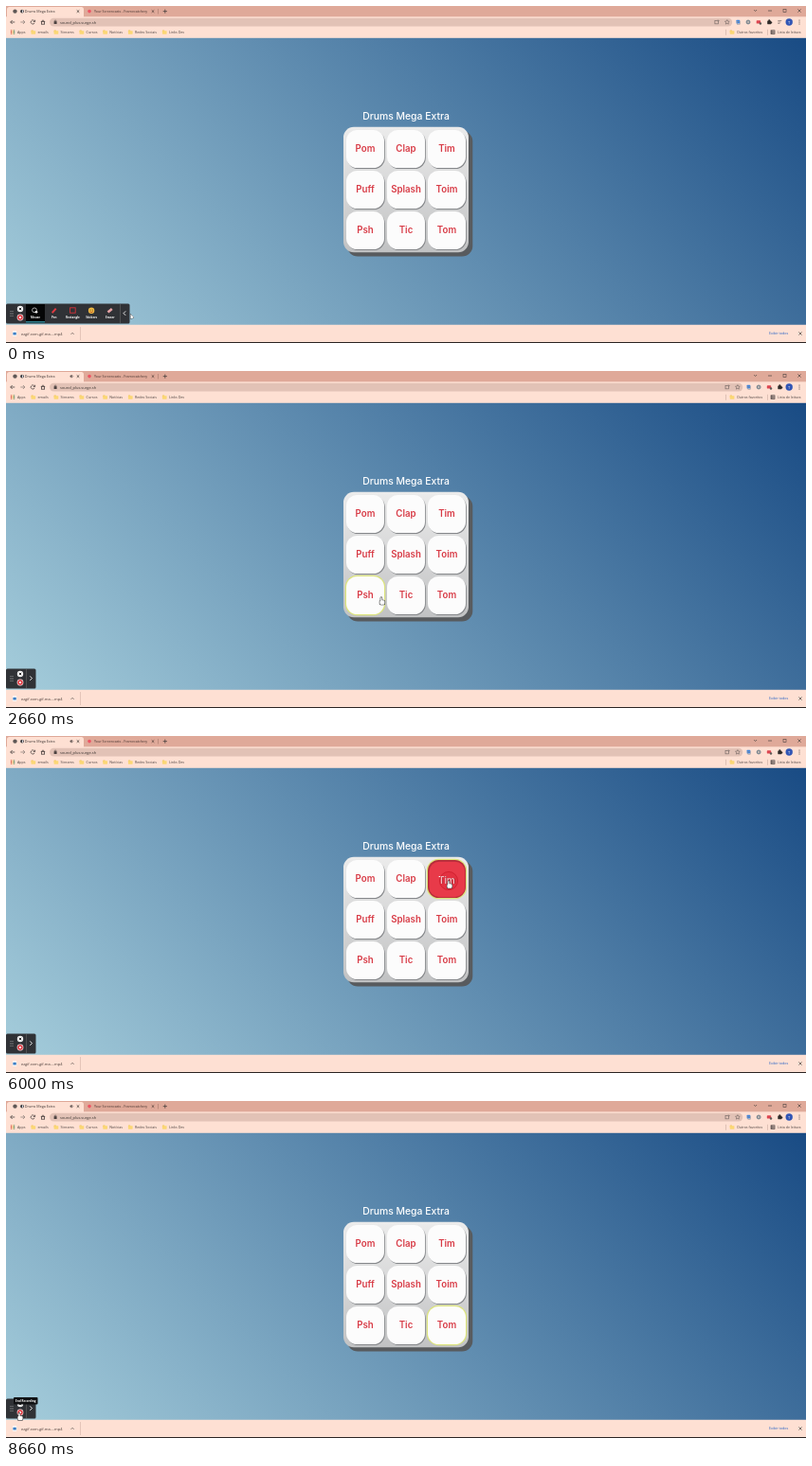
An HTML page with a canvas that plays this animation: 844x356 px, repeating every 8.73 s.

```html
<!DOCTYPE html>
<html lang="pt-BR">
<head>
<meta charset="utf-8">
<title>Drums Mega Extra</title>
<style>
html, body { margin: 0; width: 100%; height: 100%; overflow: hidden; }
canvas { display: block; width: 100vw; height: 100vh; }
</style>
</head>
<body>
<canvas id="stage"></canvas>
<script>
const W = 844, H = 356, LOOP = 8730, FPS = 15;
const TOP = 33.6, BOTTOM = 336.8;
const PAD = 40, STEP = 43, RADIUS = 11.5;
const canvas = document.getElementById('stage');
const g = canvas.getContext('2d');
const TITLE = 'Drums Mega Extra';
const PADS = ['Pom', 'Clap', 'Tim', 'Puff', 'Splash', 'Toim', 'Psh', 'Tic', 'Tom'];
const INK = '#4b4240', PEACH = '#fee0d3', STRIP = '#dfa999', RED = '#df3b43';
const UI = '"Open Sans", "Noto Sans", sans-serif';
const BRAND = 'Inter, sans-serif';

const padX = i => 359 + i % 3 * STEP;
const padY = i => 131 + Math.floor(i / 3) * STEP;

// Pads are played column by column: down, up, down.
const snake = n => {
  const col = Math.floor(n / 3), row = col % 2 ? 2 - n % 3 : n % 3;
  return row * 3 + col;
};
const TAPS = [1.4, 1.85, 2.35, 2.97, 3.5, 4.13, 5.92, 6.93, 7.55]
  .map((time, n) => ({ time, pad: snake(n) }));

const COLLAPSE = .32, FINISH = 8.45;
const STOPS = [
  { time: 0, x: 131.5, y: 325.5 },
  { time: COLLAPSE, x: 125, y: 325 },
  { time: 1.1, x: 387.5, y: 194.5 },
  ...TAPS.map(({ time, pad }) => ({ time, x: padX(pad) + PAD / 2 + 2, y: padY(pad) + PAD / 2 + 2 })),
  { time: FINISH, x: 14, y: 329.5 }
];

function rect(x, y, w, h, color) {
  g.fillStyle = color;
  g.fillRect(x, y, w, h);
}
function round(x, y, w, h, r, color) {
  g.beginPath();
  g.roundRect(x, y, w, h, r);
  g.fillStyle = color;
  g.fill();
}
function box(x, y, w, h, color, width = .6) {
  g.strokeStyle = color;
  g.lineWidth = width;
  g.strokeRect(x - w / 2, y - h / 2, w, h);
}
function dot(x, y, r, color) {
  g.beginPath();
  g.arc(x, y, r, 0, Math.PI * 2);
  g.fillStyle = color;
  g.fill();
}
function arc(x, y, r, color, width = .7, from = 0, to = Math.PI * 2) {
  g.beginPath();
  g.arc(x, y, r, from, to);
  g.strokeStyle = color;
  g.lineWidth = width;
  g.stroke();
}
function line(color, width, x1, y1, x2, y2) {
  g.beginPath();
  g.moveTo(x1, y1);
  g.lineTo(x2, y2);
  g.strokeStyle = color;
  g.lineWidth = width;
  g.stroke();
}
function cross(x, y, r, color, width = .7) {
  line(color, width, x - r, y - r, x + r, y + r);
  line(color, width, x + r, y - r, x - r, y + r);
}
// Chevron with its tip at x, y; quarter turns from pointing right
function chevron(x, y, r, turns, color, width = .8) {
  g.save();
  g.translate(x, y);
  g.rotate(turns * Math.PI / 2);
  g.beginPath();
  g.moveTo(-r, -r);
  g.lineTo(0, 0);
  g.lineTo(-r, r);
  g.strokeStyle = color;
  g.lineWidth = width;
  g.stroke();
  g.restore();
}
function label(text, x, y, size, color = INK, weight = 400, align = 'left', family = UI) {
  g.font = `${weight} ${size}px ${family}`;
  g.textAlign = align;
  g.fillStyle = color;
  g.fillText(text, x, y);
  return g.measureText(text).width;
}
function folder(x) {
  round(x - 2.3, 25.6, 2.4, 2, .4, '#f0c65f');
  round(x - 2.3, 26.2, 4.7, 3.5, .4, '#fbd775');
}

function drawTabs(sound) {
  rect(0, 0, W, 11.5, STRIP);
  round(1, 1, 81, 12, [2.5, 2.5, 0, 0], PEACH);
  dot(9.5, 5.6, 2.2, '#5f5856');
  dot(17, 5.6, 1.9, '#3b3c42');
  rect(17, 4.3, 1, 2.6, '#d8d8dc');
  label(TITLE, 19.7, 7, 3.7, '#3b3432');
  if (sound) {
    rect(67.6, 4.8, 1.2, 1.6, INK);
    rect(68.6, 4, 1, 3.2, INK);
    arc(69.4, 5.6, 1.4, INK, .5, -.7, .7);
  }
  cross(76, 5.6, 1.3, '#302b29');
  dot(88, 5.6, 1.8, '#ee5564');
  label('Your Screencasts - Framecatchery', 93, 7, 3.6, '#493733');
  cross(155, 5.6, 1.3, '#493733');
  rect(160, 3, .6, 5.5, '#a97a6d');
  line(INK, .8, 165.7, 5.6, 169.9, 5.6);
  line(INK, .8, 167.8, 3.5, 167.8, 7.7);
  chevron(790.6, 5.5, 1.5, 1, INK, .7);
  line(INK, .7, 804, 5, 808, 5);
  box(821.5, 5, 3, 3, INK);
  cross(837, 5, 1.6, INK);
}

function star(x, y, r) {
  g.beginPath();
  for (let i = 0; i < 10; i++) {
    const a = i * Math.PI / 5 - Math.PI / 2, d = i % 2 ? r / 2 : r;
    g.lineTo(x + d * Math.cos(a), y + d * Math.sin(a));
  }
  g.closePath();
  g.strokeStyle = '#6b5f5c';
  g.lineWidth = .6;
  g.stroke();
}

const ICONS = [
  x => { box(x, 17.2, 3.6, 3.3, '#6b5f5c'); chevron(x + 2.4, 15.5, 1, 0, '#6b5f5c', .6); },
  x => star(x, 17.1, 2.5),
  x => { round(x - 1.4, 14.8, 3.6, 3.6, .5, '#4184dc'); box(x + 1.2, 18, 2.8, 2.6, '#8c9299', .5); },
  x => { arc(x, 17, 1.9, '#5d7280', 1); dot(x, 17, .8, '#5d7280'); },
  x => { round(x - 2.4, 15.3, 4.4, 3.3, .7, '#dd4650'); dot(x + 1.8, 18.5, 1.2, '#5f5856'); },
  x => { round(x - 2, 15.6, 4, 3.6, .4, '#302b29'); dot(x, 15.3, 1, '#302b29'); dot(x + 2.1, 17.4, 1, '#302b29'); },
  x => { for (let i = 0; i < 3; i++) rect(x - 2, 15 + i * 1.7, 4 - i, .6, '#6b5f5c'); }
];

function drawToolbar(sound) {
  rect(0, 11.5, W, TOP - 11.5, PEACH);
  for (const [x, side, color] of [[7, -1, INK], [17.6, 1, '#8f817c']]) {
    line(color, .8, x - 2.3, 17, x + 2.3, 17);
    chevron(x + 2.3 * side, 17, 2, 1 - side, color);
  }
  arc(28.3, 17, 2.1, INK, .8, .5, 5.6);
  chevron(30.6, 16.6, 1.3, .5, INK);
  chevron(39, 14.8, 2.2, 3, INK);
  box(39, 17.9, 3.2, 2.6, INK, .8);

  // The media button leaves while a pad is sounding.
  const icons = sound ? ICONS.slice(0, -1) : ICONS;
  const first = 816.3 - 11.1 * (icons.length - 1);
  round(46, 12.8, first + 16.5 - 46, 8.6, 4.3, '#e2c2b6');
  round(50.6, 16.3, 3, 2.8, .4, INK);
  arc(52.1, 16, 1, INK, .6);
  label('sound_plus.surge.sh', 57, 18.5, 4, '#3b3432');
  icons.forEach((icon, i) => icon(first + i * 11.1));
  dot(826.2, 17, 3.7, '#3155b5');
  label('T', 826.2, 18.5, 4, '#fff', 400, 'center');
  for (let i = -1; i < 2; i++) dot(837, 17 + i * 2, .55, INK);
}

function drawBookmarks() {
  const tints = ['#dd5144', '#e3a43d', '#4b8b61'];
  for (let i = 0; i < 9; i++) rect(4.9 + i % 3 * 1.6, 25.4 + Math.floor(i / 3) * 1.6, 1.1, 1.1, tints[i % 3]);
  let x = 12;
  for (const name of ['Apps', 'emails', 'Streams', 'Cursos', 'Notícias', 'Redes Sociais', 'Links Dev']) {
    if (x > 12) folder(x - 4.7);
    x += label(name, x, 29, 3.7) + 12.9;
  }
  rect(759, 24.8, .6, 6, '#c9aba0');
  folder(766);
  label('Outros favoritos', 771, 29, 3.6);
  rect(803, 24.8, .6, 6, '#c9aba0');
  round(806.6, 25.3, 4.8, 4.6, .4, '#6b5f5c');
  for (let i = 0; i < 2; i++) rect(808.4, 26.3 + i * 2, 2.3, .6, PEACH);
  label('Lista de leitura', 814, 29, 3.6);
}

function drawDownloads() {
  rect(0, BOTTOM, W, 355 - BOTTOM, PEACH);
  round(7, 343.3, 4.2, 5.4, .4, '#fff');
  round(7.4, 344.8, 3.4, 2.7, .3, '#3d7fc4');
  label('ezgif.com-gif-ma....mp4', 16, 347.5, 4, '#493c38');
  chevron(70.1, 345.3, 1.5, 3, INK, .7);
  rect(78, 339, .7, 14, '#d8b8ac');
  label('Exibir todos', 805, 347.3, 3.7, '#2762c5');
  cross(838, 346, 1.6, INK);
  rect(0, 355, W, 1, '#2b2422');
}

function drawPad(i, focused, pressed) {
  const x = padX(i), y = padY(i);
  if (focused) round(x - 1.2, y - 1.2, PAD + 2.4, PAD + 2.4, RADIUS + 1, '#dce47c');
  else round(x + .8, y + 1.1, PAD, PAD, RADIUS, '#85878a');
  round(x, y, PAD, PAD, RADIUS, pressed ? '#b42c3a' : '#fcfcfc');
  const base = y + (pressed ? 24.8 : 23.3);
  if (pressed) {
    round(x + 1.5, y + 1.7, PAD - 2.3, PAD - 2.5, RADIUS - 1, '#e83a49');
    label(PADS[i], x + 20.6, base + .6, 9.7, '#8f2630', 600, 'center', BRAND);
  }
  label(PADS[i], x + PAD / 2, base, 9.7, pressed ? '#fff' : '#d83b46', 600, 'center', BRAND);
}

function drawPage(tap, age) {
  const mid = (TOP + BOTTOM) / 2, reach = (W + BOTTOM - TOP) / 4;
  const sky = g.createLinearGradient(W / 2 - reach, mid + reach, W / 2 + reach, mid - reach);
  sky.addColorStop(0, '#a5cddb');
  sky.addColorStop(1, '#194b84');
  rect(0, TOP, W, BOTTOM - TOP, sky);
  label(TITLE, 422, 119.8, 10.4, '#fff', 500, 'center', BRAND);
  round(360, 132, 132.3, 132.5, 11, '#585b5e');
  const metal = g.createLinearGradient(0, 128, 0, 260);
  metal.addColorStop(0, '#ebebeb');
  metal.addColorStop(1, '#c1c2c3');
  round(356, 127.7, 132, 132.5, 11, metal);
  PADS.forEach((_, i) => {
    const focused = tap && tap.pad === i;
    drawPad(i, focused, focused && age < .15);
  });
}

const TOOLS = {
  Mouse: x => { arc(x - 1, 321.3, 2.4, '#e8e8e8'); dot(x + 1, 323.3, 1.3, '#fff'); },
  Pen: x => line('#e33b42', 2, x - 2, 324.2, x + 2, 319.6),
  Rectangle: x => box(x, 321.5, 5.6, 5.4, '#d83239', .9),
  Stickers: x => {
    dot(x, 321.8, 3.2, '#f2bd45');
    for (const side of [-1, 1]) dot(x + side * 1.1, 321, .5, '#4c3511');
    arc(x, 322, 1.6, '#a63a24', .7, .2, 2.9);
  },
  Eraser: x => line('#e8a3a6', 2.6, x - 2.3, 323.6, x + 2, 320)
};

function drawRecorder(open, tip) {
  const w = open ? 130.5 : 31.5;
  round(0, 314.5, w, 21, 1.5, '#303236');
  for (let i = 0; i < 6; i++) dot(5 + i % 2 * 2, 322.5 + Math.floor(i / 2) * 2.4, .55, '#aaa');
  dot(15, 320, 3.2, '#f5f5f5');
  cross(15, 320, 1.2, '#222', .9);
  dot(15, 329, 3.4, '#f3d9d9');
  dot(15, 329, 2.7, RED);
  rect(14, 328, 2, 2, '#fff');
  rect(w - 10.5, 315, .6, 20, '#666');
  chevron(open ? 124 : 27.5, 324.6, 2.2, open ? 2 : 0, '#fff', .9);
  if (open) {
    rect(21, 315, 20, 20, '#050607');
    rect(21, 333.2, 20, 1.3, '#3a9db0');
    Object.entries(TOOLS).forEach(([name, icon], i) => {
      const x = 31 + i * 19.7;
      icon(x);
      label(name, x, 330.2, 3, '#fff', 700, 'center');
    });
  }
  if (tip) {
    round(8, 313, 25.5, 7.6, 1, '#111214');
    label('End Recording', 20.7, 318, 3, '#fff', 700, 'center');
  }
}

// Rest briefly on each stop, then ease to the next one.
function pointerAt(t) {
  const next = STOPS.findIndex(s => s.time > t);
  if (next < 0) return STOPS[STOPS.length - 1];
  const a = STOPS[next - 1], b = STOPS[next];
  const from = a.time + .15, to = b.time - .05;
  const u = Math.min(1, Math.max(0, (t - from) / (to - from)));
  const e = u * u * (3 - 2 * u);
  return { x: a.x + (b.x - a.x) * e, y: a.y + (b.y - a.y) * e };
}

function overControl(x, y, open) {
  const inside = (left, top, w, h) => x >= left && x <= left + w && y >= top && y <= top + h;
  return inside(0, 314, open ? 130 : 31, 22) ||
    PADS.some((_, i) => inside(padX(i), padY(i), PAD, PAD));
}

function drawPointer(x, y, hand) {
  g.save();
  g.translate(x, y);
  g.beginPath();
  if (hand) {
    g.roundRect(-.7, 0, 1.4, 5, .7);
    g.roundRect(-1.6, 3.2, 5.2, 4.6, 1.4);
  } else {
    g.moveTo(0, 0);
    g.lineTo(0, 5);
    g.lineTo(3.5, 3.5);
    g.closePath();
  }
  g.strokeStyle = '#222';
  g.lineWidth = hand ? 1.1 : .7;
  g.stroke();
  g.fillStyle = '#fff';
  g.fill();
  g.restore();
}

function draw(t) {
  const tap = TAPS.filter(p => p.time <= t).pop();
  const age = tap ? t - tap.time : Infinity;
  const open = t < COLLAPSE;
  const { x, y } = pointerAt(t);
  drawPage(tap, age);
  drawTabs(!!tap);
  drawToolbar(!!tap);
  drawBookmarks();
  drawDownloads();
  drawRecorder(open, t > FINISH);
  if (age < .2) {
    const r = 8 + age * 20;
    dot(x, y, r, 'rgba(214,30,46,.3)');
    arc(x, y, r, 'rgba(205,28,44,.8)', 1);
  }
  drawPointer(x, y, overControl(x, y, open));
}

function resize() {
  const ratio = window.devicePixelRatio || 1;
  canvas.width = Math.round(innerWidth * ratio);
  canvas.height = Math.round(innerHeight * ratio);
  g.setTransform(canvas.width / W, 0, 0, canvas.height / H, 0, 0);
}

const start = performance.now();
function tick() {
  const ms = (performance.now() - start) % LOOP;
  draw(Math.floor((ms + 7) * FPS / 1000) / FPS);
  requestAnimationFrame(tick);
}
addEventListener('resize', resize);
resize();
tick();
</script>
</body>
</html>
```
